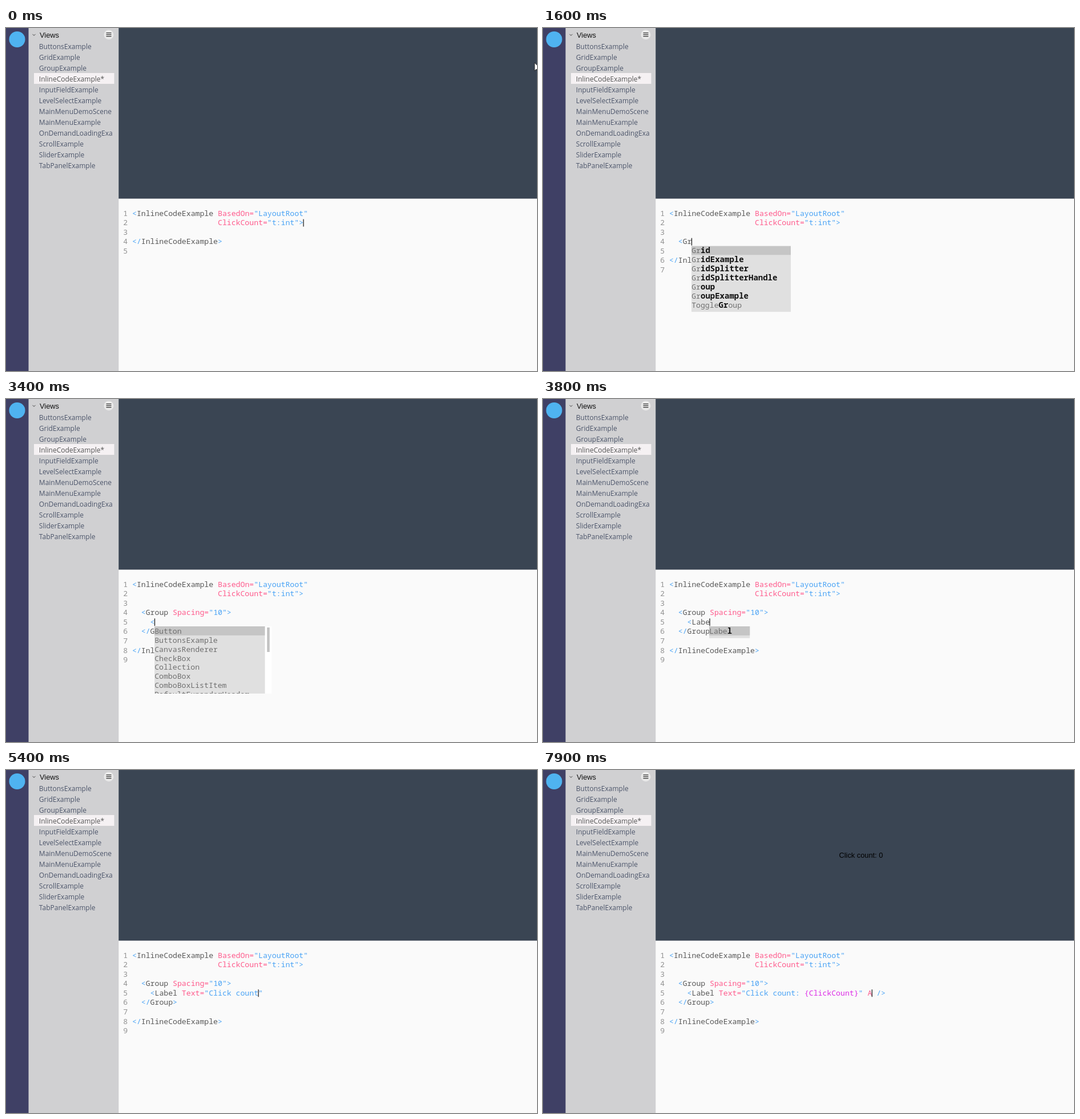
An HTML page that plays this animation: 930x602 px, repeating every 8000 ms.

```html
<!DOCTYPE html>
<html lang="en">
<head>
<meta charset="utf-8">
<title>Inline code example</title>
<style>
  html, body { margin: 0; width: 100%; height: 100%; overflow: hidden; }
  svg { display: block; width: 930px; height: 602px; }
  text { white-space: pre; }
  .code { font: 13.16px "Noto Sans Mono", "DejaVu Sans Mono", monospace; }
  .match { font-size: 14px; font-weight: 600; fill: #111; }
  .list { font: 12px "Open Sans", "Noto Sans", sans-serif; fill: #4d566b; }
  .selected { fill: #555; }
  .ui { font-family: "Liberation Sans", Arial, sans-serif; fill: #111; }
</style>
</head>
<body>
<svg viewBox="0 0 930 602">
  <defs><clipPath id="clip"><rect id="clipBox"/></clipPath></defs>
  <rect width="930" height="602" fill="#fafafa"/>
  <rect x="197" width="733" height="299.5" fill="#3a4553"/>
  <rect x="39" width="158.3" height="602" fill="#d0d0d2"/>
  <rect width="39.5" height="602" fill="#3f4065"/>
  <circle cx="19.5" cy="20" r="14" fill="#4fb3f0"/>
  <path d="M46.5 10.8l2.5 2.5 2.5-2.5" fill="none" stroke="#444"/>
  <text class="ui" x="59" y="16.5" font-size="12.8">Views</text>
  <circle cx="180" cy="11.8" r="8.5" fill="#e9e9e9"/>
  <path d="M175.5 8.7h9M175.5 11.7h9M175.5 14.7h9" stroke="#333" stroke-width="1.3"/>
  <rect x="49" y="79" width="140.5" height="19" fill="#f5f1f3"/>
  <g id="views" class="list"></g>
  <text id="preview" class="ui" x="518.5" y="153.5" font-size="12.8" style="fill:#000">Click count: 0</text>
  <g id="editor" class="code"></g>
  <g id="popup" class="code"></g>
  <rect id="caret" width="1.2" height="13" fill="#111"/>
  <path id="mouse" d="M925.8 61v14.2l3.2-3 2.2 5 2.2-1-2.2-5h4.6z" fill="#fff" stroke="#111" stroke-width=".8"/>
</svg>
<script>
const LOOP = 8000, CHAR = 7.895, LINE = 16.55, ROW = 15.85, LEFT = 221;
const PLAIN = '#595959', BLUE = '#4aa3f5', PINK = '#ff5a8c', MAGENTA = '#dc2ce6';
const el = id => document.getElementById(id);
const esc = s => s.replace(/&/g, '&amp;').replace(/</g, '&lt;');
const span = (s, attrs) => `<tspan ${attrs}>${esc(s)}</tspan>`;
const paint = (s, color) => span(s, `fill="${color}"`);
const rect = (x, y, w, h, fill) =>
  `<rect x="${x}" y="${y}" width="${w}" height="${h}" fill="${fill}"/>`;

const views = ['ButtonsExample', 'GridExample', 'GroupExample', 'InlineCodeExample*',
  'InputFieldExample', 'LevelSelectExample', 'MainMenuDemoScene', 'MainMenuExample',
  'OnDemandLoadingExa', 'ScrollExample', 'SliderExample', 'TabPanelExample'];
el('views').innerHTML = views.map((name, i) =>
  `<text x="57.8" y="${36.8 + 19 * i}"${name.endsWith('*') ? ' class="selected"' : ''}>${name}</text>`
).join('');

const elements = ['Button', 'ButtonsExample', 'CanvasRenderer', 'CheckBox', 'Collection',
  'ComboBox', 'ComboBoxListItem', 'DefaultExpanderHeader', 'Expander', 'Grid', 'GridExample',
  'GridSplitter', 'GridSplitterHandle', 'Group', 'GroupExample', 'Image', 'InputField', 'Label',
  'LayoutRoot', 'LevelSelectExample', 'List', 'ListItem', 'OnDemandLoadingExample', 'Region',
  'ScrollExample', 'Slider', 'TabPanel', 'ToggleGroup'];
const attributes = ['Alignment', 'Alpha', 'BackgroundColor', 'BackgroundSprite',
  'BlockRaycasts', 'Click', 'ContentAlignment', 'DisableLayoutUpdate', 'Height'];

// Editor states: text lines with "|" at the caret, and the kind of completion list.
const states = [];
const show = (at, lines, list) => states.push({ at, lines, list });
const type = (times, text, wrap, list) => times.forEach((at, i) =>
  show(at, wrap(text.slice(0, i + 1) + '|'), list));
const spread = (from, to, n) => Array.from({ length: n }, (_, i) =>
  Math.round((from + (to - from) * i / (n - 1)) / 50) * 50);

const root = ['<InlineCodeExample BasedOn="LayoutRoot"', ' '.repeat(19) + 'ClickCount="t:int">'];
const end = ['</InlineCodeExample>', ''];
const body = (...lines) => [...root, '', ...lines, '', ...end];
const group = s => body('  ' + s);
const label = s => body('  <Group Spacing="10">', '    ' + s, '  </Group>');
const text = s => label(`<Label Text="${s}"`);
const after = s => label('<Label Text="Click count: {ClickCount}"' + s);

show(0, [root[0], root[1] + '|', '', ...end]);
show(300, [...root, '|', '', ...end]);
show(550, group('|'));

show(1200, group('<|'));
show(1250, group('<|'), 'elements');
type([1400, 1600, 1650, 1750, 1850], 'Group', s => group('<' + s), 'elements');
show(1950, group('<Group |'), 'attributes');
type([2100, 2150, 2250, 2350, 2450, 2550, 2600], 'Spacing', s => group('<Group ' + s));
show(2700, group('<Group Spacing="|"'));
type([2800, 2900], '10', s => group(`<Group Spacing="${s}"`));
show(3000, group('<Group Spacing="10">|</Group>'));
show(3100, label('|'));

show(3350, label('<|'));
show(3400, label('<|'), 'elements');
type([3550, 3650, 3750, 3800, 3900], 'Label', s => label('<' + s), 'elements');
show(3950, label('<Label |'), 'attributes');
type([4050, 4100, 4200, 4250], 'Text', s => label('<Label ' + s));
show(4350, text('|'));
type(spread(4550, 5550, 13), 'Click count: ', text);
type(spread(5750, 6650, 11), '{ClickCount', s => text('Click count: ' + s));
show(6800, text('Click count: {ClickCount}|'));

show(7050, after('|'));
show(7150, after(' |'));
show(7250, after(' /|'));
show(7400, after(' />|'));
show(7550, after('| />'));
show(7700, after(' | />'));
show(7800, after(' | />'), 'wide');
show(7900, after(' A| />'));

function highlight(line) {
  const token = /(<\/?)(\w*)|("[^"]*"?)|(\/>?|>)|(\w+=?)|\s+/g;
  return line.replace(token, (all, open, tag, string, close, attr) => {
    if (open) return paint(open, BLUE) + paint(tag, PLAIN);
    if (string) return string.split(/(\{[^}"]*\}?)/)
      .map(part => paint(part, part[0] === '{' ? MAGENTA : BLUE)).join('');
    if (close) return paint(close, BLUE);
    return attr ? paint(attr, PINK) : all;
  });
}

const centre = row => 325 + LINE * row;

function drawLine(line, row) {
  const y = centre(row) + 4.7;
  return `<text x="205.3" y="${y}" fill="#929292">${row + 1}</text>` +
    `<text x="${LEFT}" y="${y}">${highlight(line)}</text>`;
}

// A typed prefix stays grey; a match inside a word is the bold part instead.
function entry(name, query) {
  const at = name.toLowerCase().indexOf(query.toLowerCase()), stop = at + query.length;
  const grey = s => paint(s, '#707070');
  const bold = s => span(s, 'class="match"');
  if (!query) return grey(name);
  if (at === 0) return grey(name.slice(0, stop)) + bold(name.slice(stop));
  return grey(name.slice(0, at)) + bold(name.slice(at, stop)) + grey(name.slice(stop));
}

function drawPopup(list, before, x, top) {
  if (!list) return '';
  const query = list === 'elements' ? before.match(/\w*$/)[0] : '';
  const find = name => name.toLowerCase().indexOf(query.toLowerCase());
  const names = (list === 'elements' ? elements : attributes)
    .filter(name => find(name) >= 0)
    .sort((a, b) => (find(a) > 0) - (find(b) > 0));
  const scrolls = names.length > 7;
  const longest = Math.max(...names.map(name => name.length));
  const columns = list === 'wide' ? 31 : list === 'attributes' ? 22 : longest;
  const full = columns * CHAR + 32, width = full - (scrolls ? 12 : 0);
  const height = scrolls ? 118 : names.length * ROW + 5;
  const box = { x, y: top, width: full, height };
  for (const key in box) el('clipBox').setAttribute(key, box[key]);
  const bar = scrolls
    ? rect(x + width, top, 12, height, '#fff') + rect(x + width + 3.5, top + 2, 4.5, 43, '#c2c2c2')
    : '';
  const rows = names.slice(0, 8).map((name, i) =>
    `<text x="${x + .2}" y="${top + ROW * i + 13}">${entry(name, query)}</text>`);
  return `<g clip-path="url(#clip)">${rect(x, top, width, height, '#e0e0e0')}` +
    rect(x, top, width, ROW, '#c5c5c5') + bar + rows.join('') + '</g>';
}

let shown;
function render(t) {
  el('mouse').style.display = t < 50 ? '' : 'none';
  el('preview').style.display = t >= 7400 ? '' : 'none';
  const state = states.filter(s => s.at <= t).pop();
  if (state === shown) return;
  shown = state;
  const row = state.lines.findIndex(line => line.includes('|'));
  const before = state.lines[row].split('|')[0];
  const x = LEFT + before.length * CHAR;
  el('editor').innerHTML = state.lines.map((line, i) => drawLine(line.replace('|', ''), i)).join('');
  el('popup').innerHTML = drawPopup(state.list, before, Math.round(x - .6), centre(row) + 7.8);
  el('caret').setAttribute('x', x - .6);
  el('caret').setAttribute('y', centre(row) - 6);
}

const start = performance.now();
function tick() {
  render((performance.now() - start) % LOOP);
  requestAnimationFrame(tick);
}
tick();
</script>
</body>
</html>
```
